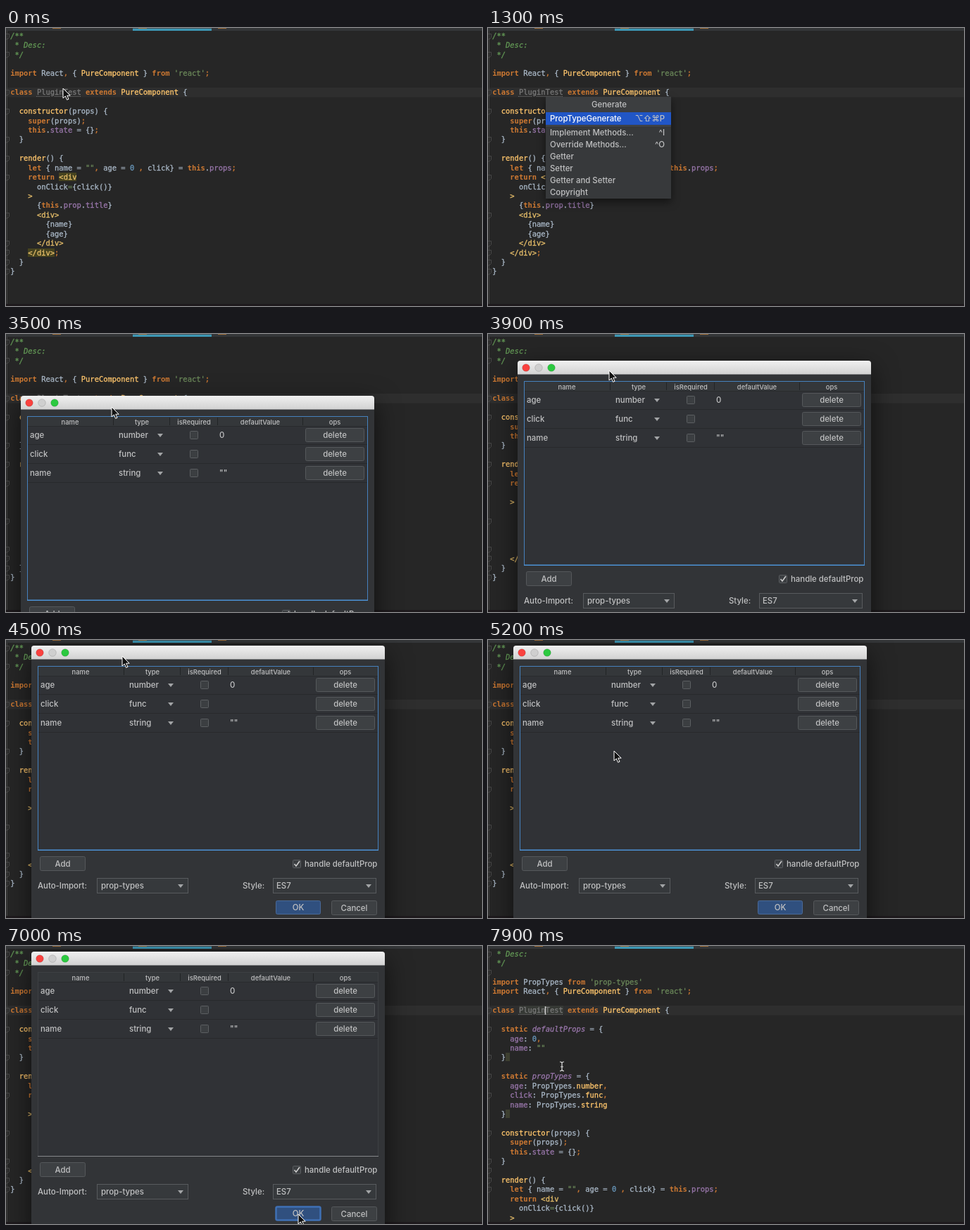
Animation, 676 px wide and 396 px high, one loop 8000 ms. Source, as an HTML page:

```html
<!DOCTYPE html>
<html lang="en">
<head>
<meta charset="utf-8">
<title>Generate prop types</title>
<style>
html, body { margin: 0; width: 100%; height: 100%; overflow: hidden; background: #262626; }
svg, pre { position: absolute; left: 0; top: 0; margin: 0; }
pre { left: 6.2px; top: 4.8px; font: 10.44px/13.42px "DejaVu Sans Mono", monospace; color: #a9b7c6; -webkit-text-stroke: .3px; }
.k { color: #cc7832; font-weight: bold; -webkit-text-stroke: 0; }
.o { color: #cc7832; }
.y { color: #ffc66d; }
.t { color: #e8bf6a; }
.m { color: #e8bf6a; }
.lit .m { background: #45421f; }
.p { color: #9876aa; }
.i { color: #9876aa; font-style: italic; }
.s { color: #6a8759; }
.n { color: #6897bb; }
.c { color: #629755; font-style: italic; }
.u { color: #787878; text-decoration: underline dotted #777; text-underline-offset: 2px; }
#after .u { background: #363935; }
.h { background: #3d3f30; }
svg text { font: 500 11.4px Inter, sans-serif; fill: #c0c1c2; }
svg .head { font-size: 9.4px; }
#shade { filter: drop-shadow(0 11px 18px rgba(0, 0, 0, .6)); }
#popup { filter: drop-shadow(0 5px 6px rgba(0, 0, 0, .5)); }
</style>
</head>
<body>
<svg id="back" width="676" height="396"></svg>
<pre id="before"></pre>
<pre id="after"></pre>
<svg id="front" width="676" height="396">
  <path id="caret" d="M81.5 86v12" stroke="#d0d0d0" stroke-width="1.5"/>
  <g id="menu"></g>
  <g id="dialog"></g>
  <path id="arrow" d="M0 0v14l3.3-3 2.3 5.3 2.4-1-2.3-5.1h4.5z" fill="#111" stroke="#fff"/>
  <path id="beam" d="M-3-6q3 0 3 2q0-2 3-2M0-4V5M-3 7q3 0 3-2q0 2 3 2M-2 1h4" fill="none" stroke="#ddd" stroke-width="1.2"/>
</svg>
<script>
const $ = id => document.getElementById(id);

// Styled runs sit between @ signs and start with their class letter.
const paint = code => code.split('@').map((s, i) => {
  const n = i % 2;
  const text = s.slice(n).replace(/</g, '&lt;');
  return n ? `<span class="${s[0]}">${text}</span>` : text;
}).join('');

const react = `@kimport@ React@o,@ { @yPureComponent@ } @kfrom@ @s'react'@@o;@

@kclass@ @uPluginTest@ @kextends@ @yPureComponent@ {
`;
const body = `
  @yconstructor@(props) {
    @ksuper@(props)@o;@
    @kthis@.@pstate@ = {}@o;@
  }

  @yrender@() {
    @klet@ { name = @s""@@o,@ age = @n0@ @o,@ click} = @kthis@.@pprops@@o;@
    @kreturn@ @m<div@
      onClick@s=@{click()}
    @t>@
`;
const tail = `      {@kthis@.@pprop@.@ptitle@}
      @t<div>@
        {name}
        {age}
      @t</div>@
    @m</div>@@o;@
  }
}`;
const statics = `
  @kstatic@ @idefaultProps@ = {
    @page@: @n0@@o,@
    @pname@: @s""@
  }@h @

  @kstatic@ @ipropTypes@ = {
    @page@: PropTypes.@ynumber@@o,@
    @pclick@: PropTypes.@yfunc@@o,@
    @pname@: PropTypes.@ystring@
  }@h @
`;
$('before').innerHTML = paint('@c/**@\n@c * Desc:@\n@c */@\n\n' + react + body + tail);
$('after').innerHTML = paint("@c * Desc:@\n@c */@\n\n@kimport@ PropTypes @kfrom@ @s'prop-types'@\n" + react + statics + body);

const rect = (x, y, w, h, fill, more = '') =>
  `<rect x="${x}" y="${y}" width="${w}" height="${h}" fill="${fill}" ${more}/>`;
const text = (x, y, s, anchor = 'start', more = '') =>
  `<text x="${x}" y="${y + 4}" text-anchor="${anchor}" ${more}>${s}</text>`;
const line = (d, color) => `<path d="${d}" fill="none" stroke="${color}"/>`;
const button = (x, y, w, h, s, fill = '#3d4043', edge = '#55585b', id = '') =>
  rect(x + .5, y + .5, w - 1, h - 1, fill, `rx="2" stroke="${edge}" ${id}`) + text(x + w / 2, y + h / 2, s, 'middle');
const drop = (x, y) => `<path d="M${x - 4} ${y - 2}h8l-4 5z" fill="#a2a4a6"/>`;
const box = (x, y) => rect(x + .5, y + .5, 11, 11, '#3b3e41', 'rx="1" stroke="#5c5f62"');
const combo = (x, w, s, dx) =>
  rect(x + .5, 331.5, w - 1, 21, '#36393c', 'stroke="#585b5e"') + text(x + dx, 342, s) + drop(x + w - 11, 342);

// Editor frame: tab strip, current line, gutter with fold marks
const folds = [12, 38, 92, 119, 159, 186, 213, 267, 307, 320, 334, 347];
$('back').innerHTML =
  rect(0, 0, 676, 4, '#343638') + rect(180, 0, 112, 4, '#46555c') + rect(180, 1, 112, 3, '#3c97b5') +
  [66, 188, 301].map(x => rect(x, 0, 12, 1, '#a2713c')).join('') +
  rect(0, 85, 676, 13.5, '#2e2e2e') + line('M1.5 4V393', '#414141') +
  folds.map(y => line(`M0 ${y - 3.5}h4.5v5l-2.5 2.5h-2`, '#484848')).join('') +
  rect(0, 393, 676, 3, '#1e1a1d');

const items = ['Implement Methods...', 'Override Methods...', 'Getter', 'Setter', 'Getter and Setter', 'Copyright'];
$('menu').innerHTML =
  rect(82, 98, 178, 145, '#37393b', 'id="popup"') + rect(82, 98, 178, 22, '#3c3e40') + text(172, 109, 'Generate', 'middle') +
  rect(82, 120, 178, 18, '#2156c6') + line('M82 139.5h178', '#4b4d4f') +
  text(88, 129, 'PropTypeGenerate', 'start', 'style="fill:#fff"') +
  text(251, 129, '⌥⇧⌘P', 'end') + text(251, 149, '^I', 'end') + text(251, 166, '^O', 'end') +
  items.map((s, i) => text(88, 149 + 17 * i, s)).join('');

const heads = [['name', 70], ['type', 172], ['isRequired', 246], ['defaultValue', 340], ['ops', 446]];
const rows = [['age', 'number', '0'], ['click', 'func', ''], ['name', 'string', '""']];
$('dialog').innerHTML =
  `<linearGradient id="bar" x2="0" y2="1"><stop stop-color="#f0f0f0"/><stop offset="1" stop-color="#d2d2d2"/></linearGradient>` +
  rect(0, 0, 502, 404, '#323437', 'rx="4" id="shade"') +
  '<path d="M0 19.5V4q0-4 4-4h494q4 0 4 4v15.5z" fill="url(#bar)"/>' +
  [['#f9423f', 12], ['#cfcfcf', 30], ['#2cc940', 48]].map(([c, x]) =>
    `<circle cx="${x}" cy="10" r="5.3" fill="${c}" stroke="#0002"/>`).join('') +
  rect(9, 29, 484, 263, '#303236') + rect(10, 30, 482, 13, '#34373a') + line('M10 43.5H492', '#292b2d') +
  heads.map(([s, x]) => text(x, 36.5, s, 'middle', 'class="head"')).join('') +
  line('M131.5 31v11M211.5 31v11M279.5 31v11M400.5 31v11', '#222426') +
  rows.map(([name, type, value], i) => {
    const y = 56 + 27 * i;
    return text(13, y, name) + text(139, y, type) + drop(198, y) + box(240, y - 6) + text(282, y, value) +
      button(404, y - 10, 84, 20, 'delete') + line(`M10 ${y + 13.5}H492`, '#28292c');
  }).join('') +
  rect(9.5, 29.5, 483, 262, 'none', 'id="edge"') + line('M9 291.5H493', '#85878a') +
  rect(9, 290.5, 484, 1.5, '#4c92d6', 'id="base"') +
  button(12, 300, 65, 21, 'Add') + box(371, 305) +
  '<path d="M373.5 311l2.5 3 5-7" fill="none" stroke="#ccc" stroke-width="1.6"/>' +
  text(388, 311, 'handle defaultProp') + text(9, 342, 'Auto-Import:') + combo(93, 130, 'prop-types', 6) +
  text(300, 342, 'Style:') + combo(343, 147, 'ES7', 5) +
  button(347, 363, 64, 20, 'OK', '#30507f', '#4a6a98', 'id="ok"') + button(426, 363, 65, 21, 'Cancel');

const drag = [[2200, 20, 110], [3000, 20, 110], [3400, 21, 88], [3600, 21, 88], [3900, 42, 38], [4300, 36, 8]];
const mouse = [[0, 81, 86], [2300, 81, 86], [2900, 149, 125], [3000, 149, 125], [3400, 150, 104], [3600, 150, 104],
  [3900, 172, 52], [4300, 165, 23], [4600, 165, 23], [5100, 179, 158], [5600, 179, 158], [6600, 415, 382],
  [7300, 415, 382], [7800, 105, 171]];

function at(keys, t) {
  const i = keys.findIndex(k => k[0] > t);
  if (i < 0) return keys.at(-1).slice(1);
  if (!i) return keys[0].slice(1);
  const [a, b] = [keys[i - 1], keys[i]];
  const u = (t - a[0]) / (b[0] - a[0]);
  const e = u * u * (3 - 2 * u);
  return [1, 2].map(j => Math.round(a[j] + (b[j] - a[j]) * e));
}
const show = (id, on) => { $(id).style.visibility = on ? 'visible' : 'hidden'; };
const place = (id, keys, t) => $(id).setAttribute('transform', `translate(${at(keys, t)})`);

function draw(now) {
  const t = Math.floor(now % 8000 / 100) * 100;
  const done = t >= 7300;
  const focusOk = t >= 6800;
  const beam = t >= 7500;
  show('before', !done);
  show('after', done);
  $('before').className = t < 400 ? 'lit' : '';
  show('caret', t >= 400 && t < 1000 || done);
  show('menu', t >= 1000 && t < 1800);
  $('dialog').style.display = t >= 2200 && t < 7200 ? '' : 'none';
  $('edge').setAttribute('stroke', focusOk ? '#3d4043' : '#4681bd');
  $('base').style.display = focusOk ? 'none' : '';
  $('ok').setAttribute('stroke', focusOk ? '#3f70b5' : '#4a6a98');
  $('ok').setAttribute('stroke-width', focusOk ? 2.5 : 1);
  show('arrow', !beam && (t < 1000 || t >= 2300));
  show('beam', beam);
  place('dialog', drag, t);
  place('arrow', mouse, t);
  place('beam', mouse, t);
}
(function tick() {
  draw(performance.now());
  requestAnimationFrame(tick);
})();
</script>
</body>
</html>
```
